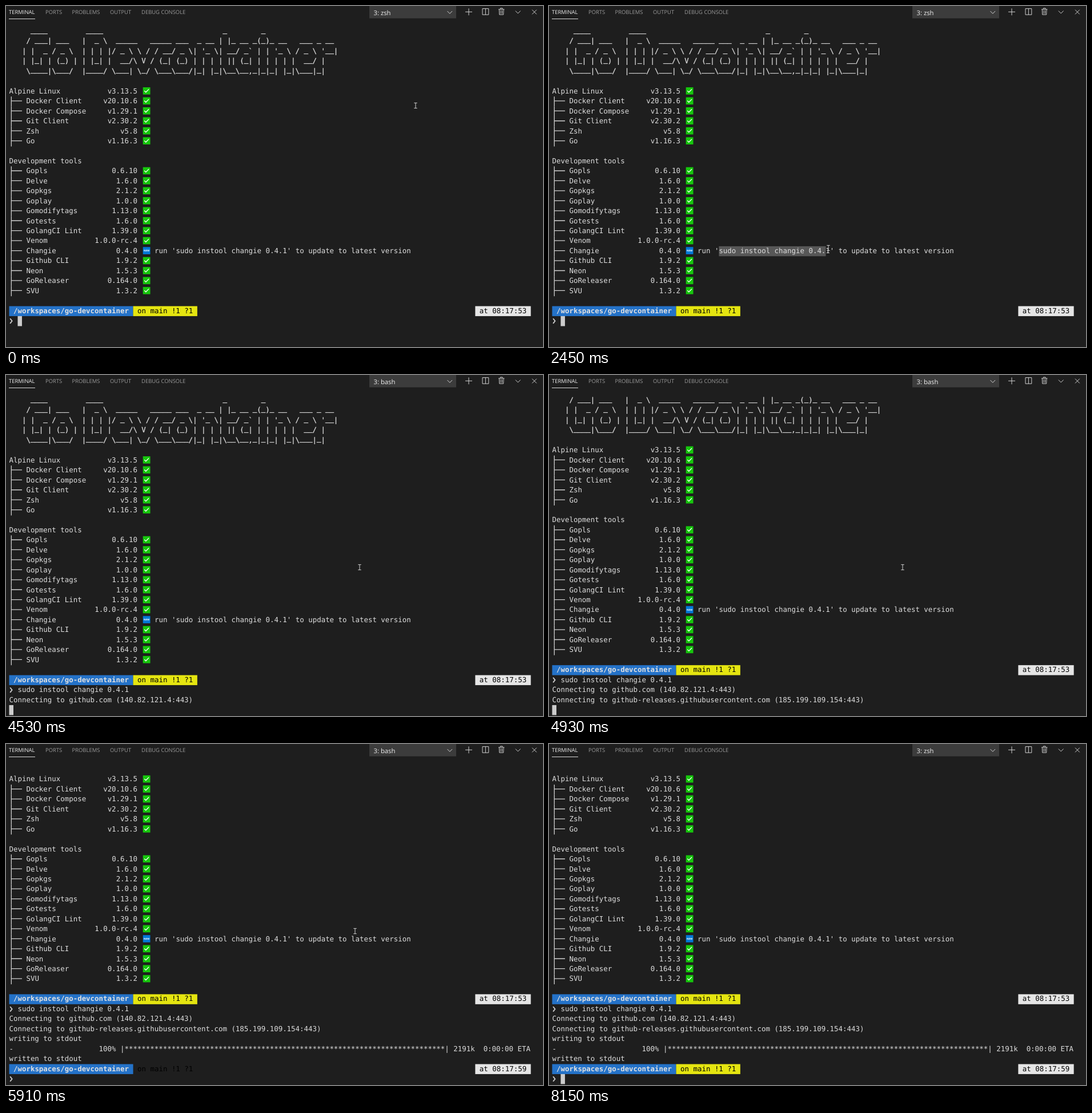
Animation, 940 px wide and 596 px high, one loop 8990 ms. Source, as an HTML page:

```html
<!DOCTYPE html>
<html lang="en">
<head>
<meta charset="utf-8">
<title>Terminal</title>
<style>
  html, body { margin: 0; width: 100%; height: 100%; overflow: hidden; background: #1e1e1e; }
  svg { display: block; width: 100vw; height: 100vh; }
  text { white-space: pre; text-rendering: geometricPrecision; }
  #screen { font: 12.4325px "DejaVu Sans Mono", monospace; fill: #dedede; }
  #bar { font: 9.45px "Open Sans", "Noto Sans", sans-serif; fill: #9a9a9a; }
  .line { fill: none; stroke: #d0d0d0; }
  .art { stroke: #dedede; stroke-width: .25; }
  .low { stroke: #dedede; stroke-width: .5; }
</style>
</head>
<body>
<svg id="stage" viewBox="0 0 940 596">
  <rect width="940" height="596" fill="#1e1e1e"/>
  <g id="bar">
    <text x="5" y="14.4" fill="#eee">TERMINAL</text>
    <text x="69" y="14.4">PORTS</text>
    <text x="115.5" y="14.4">PROBLEMS</text>
    <text x="182" y="14.4">OUTPUT</text>
    <text x="237" y="14.4">DEBUG CONSOLE</text>
    <rect x="5" y="22" width="46" height="1" fill="#d8d8d8"/>
    <rect x="636" width="152" height="21.5" fill="#3c3c3c"/>
    <text id="shell" x="643.5" y="15.6" font-size="11.3" fill="#f0f0f0"></text>
    <g class="line">
      <path d="M772.5 9l4.3 4.3 4.3-4.3M891.8 8.5l4.4 4.4 4.4-4.4"/>
      <path d="M804 10.3h12M810 4.3v12"/>
      <path d="M834 4.6h10.8v10.6h-10.8zM839.4 4.6v10.6"/>
      <path d="M862 5.9h10.4M865.3 5.6v-1.7h3.8v1.7M863.3 6.1l.4 9h7l.4-9M865.9 7.6v6M868.5 7.6v6"/>
      <path d="M921 6.6l7.8 7.8M928.8 6.6l-7.8 7.8"/>
    </g>
  </g>
  <g id="screen"></g>
  <g id="mouse">
    <path id="beam" class="line" d="M-2.7-4.6H2.7M0-4.6V4.6M-2.7 4.6H2.7"/>
    <path id="arrow" d="M-3-5V5L-.8 3 .7 6.2 2.2 5.5.8 2.4H4z" fill="#fff" stroke="#222" stroke-width=".6"/>
  </g>
</svg>
<script>
const LOOP = 8990, X0 = 5.5, Y0 = 36, CW = 7.485, RH = 17.45;
const $ = id => document.getElementById(id);
const screen = $("screen");
const rows = [];

function add(parent, tag, attrs, content) {
  const el = document.createElementNS("http://www.w3.org/2000/svg", tag);
  for (const k in attrs) el.setAttribute(k, attrs[k]);
  if (content !== undefined) el.textContent = content;
  parent.appendChild(el);
  return el;
}
const colX = c => X0 + c * CW;
const show = (el, on) => el.setAttribute("visibility", on ? "inherit" : "hidden");
const write = (r, col, s, attrs) => add(r, "text", { x: colX(col), y: 12, ...attrs }, s);
const block = (r, col, n, fill) =>
  add(r, "rect", { x: colX(col), width: n * CW, height: RH, fill });

function row(s = "") {
  const r = add(screen, "g", { transform: `translate(0 ${Y0 + rows.length * RH})` });
  rows.push(r);
  if (s) write(r, 0, s);
  return r;
}

// underscores sit just under the baseline in the banner
function artRow(s) {
  const r = row();
  write(r, 0, s.replace(/_/g, " "), { class: "art" });
  write(r, 0, s.replace(/[^_]/g, " "), { class: "low", y: 9.6 });
}

function badge(r, isNew) {
  add(r, "rect", { x: 239.7, y: 1.4, width: 12.8, height: 12.6, fill: isNew ? "#0078d7" : "#16c60c" });
  if (isNew) add(r, "text", { x: 246.1, y: 9.3, "text-anchor": "middle", fill: "#fff",
    style: "font:bold 4.4px 'Open Sans',sans-serif" }, "NEW");
  else add(r, "path", { d: "M242.2 7.4l2.6 2.7 5.2-5.4", fill: "none", stroke: "#fff", "stroke-width": 1.3 });
}

function tool(name, version, isNew) {
  const r = row();
  add(r, "path", { class: "line", "stroke-width": 1.3, d: `M9.3 0V${RH}M9.3 7.7H28` });
  write(r, 4, name);
  write(r, 30 - version.length, version);
  badge(r, isNew);
  return r;
}

function prompt(time) {
  const r = row();
  block(r, 0, 29, "#2472c8");
  write(r, 1, "/workspaces/go-devcontainer", { "font-weight": "bold", fill: "#e0e0e0" });
  const branch = block(r, 29, 15, "#e5e510");
  write(r, 30, "on main !1 ?1", { fill: "#000" });
  block(r, 109, 13, "#e5e5e5");
  write(r, 110, "at " + time, { fill: "#000" });
  return branch;
}

function inputRow() {
  const r = row();
  add(r, "path", { d: "M7.2 4.2l3.4 4.3-3.4 4.3", class: "line", "stroke-width": 1.8 });
  return r;
}

// "@" stands for a backtick
const banner = String.raw`
     ____         ____                            _        _
    / ___| ___   |  _ \  _____   _____ ___  _ __ | |_ __ _(_)_ __   ___ _ __
   | |  _ / _ \  | | | |/ _ \ \ / / __/ _ \| '_ \| __/ _@ | | '_ \ / _ \ '__|
   | |_| | (_) | | |_| |  __/\ V / (_| (_) | | | | || (_| | | | | |  __/ |
    \____|\___/  |____/ \___| \_/ \___\___/|_| |_|\__\__,_|_|_| |_|\___|_|`;
banner.slice(1).replace("@", "`").split("\n").forEach(artRow);
row();

const system = row("Alpine Linux");
write(system, 23, "v3.13.5");
badge(system);
"Docker Client=v20.10.6,Docker Compose=v1.29.1,Git Client=v2.30.2,Zsh=v5.8,Go=v1.16.3"
  .split(",").forEach(s => tool(...s.split("=")));
row();
row("Development tools");

const command = "sudo instool changie 0.4.1";
let selection;
("Gopls=0.6.10,Delve=1.6.0,Gopkgs=2.1.2,Goplay=1.0.0,Gomodifytags=1.13.0,Gotests=1.6.0," +
 "GolangCI Lint=1.39.0,Venom=1.0.0-rc.4,Changie=0.4.0,Github CLI=1.9.2,Neon=1.5.3," +
 "GoReleaser=0.164.0,SVU=1.3.2").split(",").forEach(s => {
  const [name, version] = s.split("=");
  const isNew = name === "Changie";
  const r = tool(name, version, isNew);
  if (!isNew) return;
  selection = block(r, 39, 0, "#575757");
  write(r, 34, `run '${command}' to update to latest version`);
});
row();

prompt("08:17:53");
const input = inputRow();
const pasteBack = block(input, 2, command.length, "#ccc");
const pasted = write(input, 2, command);
row("Connecting to github.com (140.82.121.4:443)");
row("Connecting to github-releases.githubusercontent.com (185.199.109.154:443)");
row("writing to stdout");
const progress = write(row(), 0, "");
row("written to stdout");
const branch = prompt("08:17:59");
inputRow();
const caret = block(screen, 0, 1, "#ccc");

// from time, last row, scroll, caret row, caret column
const states = [
  [0, 29, 0, 29, 2],
  [3700, 29, 0, 29, 28],
  [4530, 30, 0, 31, 0],
  [4930, 31, 1, 32, 0],
  [5050, 32, 2, 33, 0],
  [5360, 33, 2, 33, 122],
  [5910, 36, 5, -1, 0],
  [6030, 36, 5, 36, 2]
];

// from time, percent, size, seconds left
const loads = [[0, 5, 118, 17], [5480, 17, 379, 4], [5600, 30, 668, 2], [5910, 100, 2191, 0]];

// start, end, number of steps, points on the way
const moves = [
  [150, 870, 6, [560, 255], [330, 442], [303, 430]],
  [1150, 2170, 8, [487, 423]],
  [2450, 2450, 1, [489, 423]],
  [2910, 3060, 2, [494, 425]],
  [3340, 3940, 6, [560, 425], [625, 370], [619, 336]],
  [5360, 5600, 3, [611, 327]],
  [6030, 6880, 7, [780, 170], [872, 18]],
  [7030, 7030, 1, [831, 19]],
  [7340, 8000, 6, [815, 120], [822, 220], [922, 18]]
];

const latest = (list, t) => list.filter(s => s[0] <= t).pop();

function along(points, f) {
  const p = f * (points.length - 1), i = Math.min(Math.floor(p), points.length - 2), u = p - i;
  return points[i].map((v, k) => v + (points[i + 1][k] - v) * u);
}

function mouseAt(t) {
  let pos = [717, 174];
  for (const [start, end, n, ...points] of moves) {
    if (t < start) break;
    const gap = (end - start) / (n - 1) || 1;
    const k = Math.min(n, Math.floor((t - start) / gap + 1e-6) + 1);
    const f = k / n;
    pos = along([pos, ...points], f * f * (3 - 2 * f));
  }
  return pos;
}

function draw(t) {
  const [, last, scroll, caretRow, caretCol] = latest(states, t);
  screen.setAttribute("transform", `translate(0 ${-scroll * RH})`);
  rows.forEach((r, i) => show(r, i >= scroll && i <= last));
  show(caret, caretRow >= 0);
  caret.setAttribute("x", colX(caretCol));
  caret.setAttribute("y", Y0 + caretRow * RH);

  const fresh = t >= 3700 && t < 4530;
  show(pasteBack, fresh);
  show(pasted, t >= 3700);
  pasted.setAttribute("fill", fresh ? "#1e1e1e" : "#dedede");
  show(branch, t >= 6030);
  $("shell").textContent = t >= 4530 && t < 6030 ? "3: bash" : "3: zsh";

  const [, pct, size, left] = latest(loads, t);
  const stars = "*".repeat(Math.floor(pct * 0.75)).padEnd(75);
  progress.textContent = "-" + (pct + "%").padStart(24) + " |" + stars + "|" +
    (size + "k").padStart(6) + "  0:00:" + String(left).padStart(2, "0") + " ETA";

  const [x, y] = mouseAt(t);
  $("mouse").setAttribute("transform", `translate(${x} ${y})`);
  show($("mouse"), t < 8150);
  show($("beam"), y > 35);
  show($("arrow"), y <= 35);

  const chosen = t >= 1150 && t < 3340 ? Math.floor((x - X0) / CW) - 39 : 0;
  selection.setAttribute("width", Math.max(0, chosen) * CW);
}

const begin = performance.now();
function tick() {
  draw((performance.now() - begin) % LOOP);
  requestAnimationFrame(tick);
}
tick();
</script>
</body>
</html>
```
